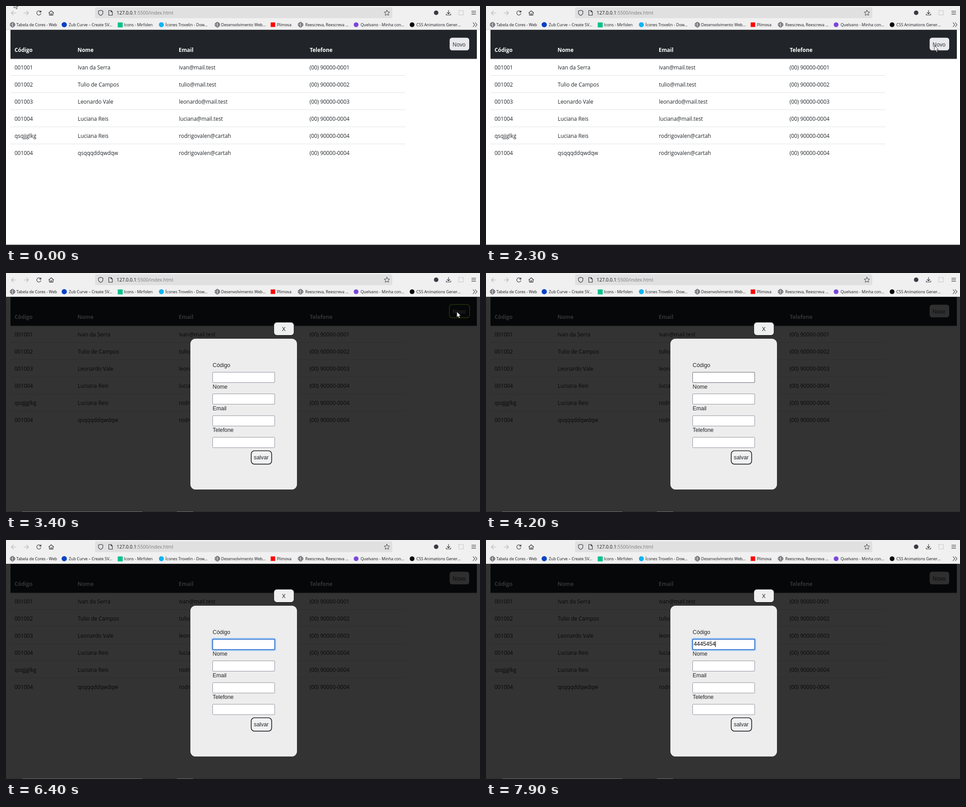
Animation of 1054x531 px, one loop 8000 ms. Source, as an HTML page:

```html
<!DOCTYPE html>
<html lang="pt-BR">
<head>
<meta charset="utf-8">
<title>Cadastro</title>
<style>
html, body { margin: 0; width: 100%; height: 100%; overflow: hidden; background: #fff; }
#stage { position: relative; width: 1054px; height: 531px; overflow: hidden; }
svg { position: absolute; left: 0; top: 0; display: block; }

.page { font: 11.9px "Open Sans", "Noto Sans", sans-serif; fill: #212529; }
.head { font-weight: 700; fill: #fff; }
.lines { stroke: #dee2e6; }
.bar { font: 8.8px "Open Sans", "Noto Sans", sans-serif; fill: #15141a; }
.url { font-size: 10.4px; }
.icon { fill: none; stroke: #2b2a33; stroke-width: 1.1; stroke-linecap: round; stroke-linejoin: round; }
.thin { stroke-width: .9; }
.faint { stroke: #b4b4b7; }
.form { font: 12.35px Arial, "Liberation Sans", sans-serif; fill: #212529; }
.field { fill: #fff; stroke: #8f8f9d; }
.list { font: 8.6px "Open Sans", "Noto Sans", sans-serif; fill: #111; }
.box { fill: #fff; stroke: #b4b4b8; }

#typed {
  position: absolute; left: 462px; top: 225px; height: 13px; width: 0;
  overflow: hidden; white-space: nowrap; color: #000;
  font: 12.35px/13px Arial, "Liberation Sans", sans-serif;
  border-right: 1px solid transparent;
}

/* 100 ms = 1.25 % */
#cursor, #hover, #modal, #over, #focus, #options, #match { animation: 8s step-end infinite; }
#cursor { animation-name: move; }
#hover { animation-name: hover; }
#modal { animation-name: open; }
#over { animation-name: over; }
#focus { animation-name: focus; }
#options { animation-name: options; }
#match { animation-name: match; }
#typed { animation: type 8s step-end infinite, blink 8s step-end infinite; }

@keyframes move {
  0% { transform: translate(18px, -8px); }
  2.5% { transform: translate(18px, -8px); animation-timing-function: steps(3); }
  6.25% { transform: translate(740px, 199px); }
  8.75% { transform: translate(740px, 199px); animation-timing-function: steps(8); }
  18.75% { transform: translate(1006px, 112px); }
  20% { transform: translate(1006px, 112px); animation-timing-function: steps(7); }
  28.75% { transform: translate(997px, 88px); }
  33.75% { transform: translate(997px, 88px); animation-timing-function: steps(4); }
  38.75% { transform: translate(1002.5px, 86px); }
  42.5% { transform: translate(1002.5px, 86px); animation-timing-function: steps(4); }
  47.5% { transform: translate(1011px, 82px); }
  48.75% { transform: translate(1011px, 82px); animation-timing-function: steps(3); }
  52.5%, 100% { transform: translate(530px, 226px); visibility: hidden; }
}
@keyframes hover {
  0% { opacity: 0; }
  28.75% { opacity: 0; animation-timing-function: steps(3); }
  32.5% { opacity: 1; }
  42.5% { opacity: 1; animation-timing-function: steps(4); }
  47.5%, 100% { opacity: 0; }
}
@keyframes open { 0% { opacity: 0; } 42.5%, 100% { opacity: 1; } }
@keyframes over { 0% { opacity: 0; } 52.5% { opacity: 1; } 55%, 100% { opacity: 0; } }
@keyframes focus { 0% { opacity: 0; } 55%, 100% { opacity: 1; } }
@keyframes options { 0% { opacity: 0; } 57.5% { opacity: 1; } 66.25% { opacity: .4; } 67.5%, 100% { opacity: 0; } }
@keyframes match { 0% { opacity: 0; } 86.25% { opacity: 1; } 97.5% { opacity: .4; } 98.75%, 100% { opacity: 0; } }
@keyframes type {
  0% { width: 0; }
  85% { width: 1ch; }
  86.25% { width: 2ch; }
  87.5% { width: 3ch; }
  90% { width: 4ch; }
  96.25% { width: 5ch; }
  97.5% { width: 6ch; }
  98.75%, 100% { width: 7ch; }
}
@keyframes blink {
  0%, 67.5%, 80%, 92.5% { border-color: transparent; }
  61.25%, 73.75%, 85%, 96.25%, 100% { border-color: #000; }
}
</style>
</head>
<body>
<div id="stage">
<svg width="1054" height="531" viewBox="0 0 1054 531">
  <defs>
    <g id="globe" class="icon thin">
      <circle r="5.3"/><ellipse rx="2.4" ry="5.3"/><path d="M-5 -1.7H5M-5 1.7H5"/>
    </g>
  </defs>

  <rect width="1054" height="531" fill="#fff"/>

  <g class="page">
    <rect x="10" y="53" width="1037" height="64.5" fill="#212529"/>
    <path d="M10 116H1047" stroke="#373b3e" stroke-width=".8"/>
    <text class="head" y="102"><tspan x="19">Código</tspan><tspan x="159">Nome</tspan><tspan x="384">Email</tspan><tspan x="675.5">Telefone</tspan></text>
    <path class="lines" d="M10 154.5H888M10 192.5H888M10 230.5H888M10 268.5H888M10 306.5H888"/>
    <text y="141"><tspan x="19">001001</tspan><tspan x="159.5">Ivan da Serra</tspan><tspan x="384.5">ivan@mail.test</tspan><tspan x="675">(00) 90000-0001</tspan></text>
    <text y="179"><tspan x="19">001002</tspan><tspan x="159.5">Tulio de Campos</tspan><tspan x="384.5">tulio@mail.test</tspan><tspan x="675">(00) 90000-0002</tspan></text>
    <text y="217"><tspan x="19">001003</tspan><tspan x="159.5">Leonardo Vale</tspan><tspan x="384.5">leonardo@mail.test</tspan><tspan x="675">(00) 90000-0003</tspan></text>
    <text y="255"><tspan x="19">001004</tspan><tspan x="159.5">Luciana Reis</tspan><tspan x="384.5">luciana@mail.test</tspan><tspan x="675">(00) 90000-0004</tspan></text>
    <text y="293"><tspan x="19">qsqjjglkg</tspan><tspan x="159.5">Luciana Reis</tspan><tspan x="384.5">rodrigovalen@cartah</tspan><tspan x="675">(00) 90000-0004</tspan></text>
    <text y="331"><tspan x="19">001004</tspan><tspan x="159.5">qsqqqddqwdqw</tspan><tspan x="384.5">rodrigovalen@cartah</tspan><tspan x="675">(00) 90000-0004</tspan></text>

    <rect x="986.5" y="70.5" width="43.5" height="28" rx="5.5" fill="#e9e9ed"/>
    <text x="993" y="90">Novo</text>
    <g id="hover">
      <rect x="985.7" y="69.7" width="45.4" height="29.7" rx="7" fill="#212529" stroke="#adff2f" stroke-width="1.6"/>
      <text x="993" y="90" fill="#fff">Novo</text>
    </g>
    <path d="M0 530.5H1054" stroke="#66666a"/>
  </g>

  <g id="modal">
    <rect y="53" width="1054" height="478" fill="#000" opacity=".8"/>
    <path d="M0 530.5H1054" stroke="#2c2729"/>
    <path d="M36 530.5H303M380 530.5H416" stroke="#747474"/>
    <g class="form">
      <rect x="595.3" y="109.3" width="45.4" height="29.6" rx="7" fill="#efefef" stroke="#212529" stroke-width="1.6"/>
      <text x="613.5" y="129">X</text>
      <rect x="410" y="146" width="237" height="335" rx="11.5" fill="#ededed"/>
      <text x="459.5" y="209">Código</text>
      <text x="459.5" y="257">Nome</text>
      <text x="459.5" y="305">Email</text>
      <text x="459.5" y="353">Telefone</text>
      <g class="field">
        <rect x="459.5" y="220.5" width="138" height="23" rx="1.5"/>
        <rect x="459.5" y="268.5" width="138" height="23" rx="1.5"/>
        <rect x="459.5" y="317" width="138" height="23" rx="1.5"/>
        <rect x="459.5" y="365" width="138" height="23" rx="1.5"/>
      </g>
      <rect x="545.3" y="395" width="45.4" height="29.6" rx="7" fill="#f1f1f1" stroke="#212529" stroke-width="1.7"/>
      <text x="551" y="414">salvar</text>
      <rect id="over" x="459.5" y="220.5" width="138" height="23" rx="1.5" fill="#fff" stroke="#676774"/>
      <g id="focus">
        <rect x="457.6" y="218.6" width="141.8" height="26.8" rx="3.5" fill="none" stroke="#a6d0f8" stroke-width="2.4"/>
        <rect x="459.5" y="220.5" width="138" height="23" rx="1.5" fill="#fff" stroke="#0a55c4" stroke-width="1.5"/>
      </g>
    </g>

    <g id="options" class="list">
      <rect class="box" x="460.5" y="243.5" width="136" height="94"/>
      <text y="256"><tspan x="464">qsq</tspan><tspan x="464" dy="15.4">dqdq</tspan><tspan x="464" dy="15.4">001004</tspan><tspan x="464" dy="15.4">qsqjjglkg</tspan><tspan x="464" dy="15.4">sfsfs</tspan><tspan x="464" dy="15.4">ss</tspan></text>
      <rect x="583" y="244" width="13" height="93" fill="#f5f5f5"/>
      <rect x="583" y="257" width="13" height="16" fill="#c9c9c9"/>
      <path class="icon" d="M586.5 251.5l3 -3 3 3M586.5 329.5l3 3 3 -3"/>
    </g>
    <g id="match" class="list">
      <rect class="box" x="460.5" y="243.5" width="136" height="16"/>
      <text x="464" y="256">444555</text>
    </g>
  </g>

  <g class="bar">
    <rect width="1054" height="52.5" fill="#f0f0f0"/>
    <path d="M0 52.5H1054" stroke="#d2d2d3"/>
    <rect x="198" y="3" width="661" height="24" rx="3.5" fill="#e1e0e0"/>
    <path class="icon faint" d="M22 15.5H12M16.5 11l-4.5 4.5 4.5 4.5M39.5 15.5H50M45.5 11l4.5 4.5 -4.5 4.5"/>
    <path class="icon" d="M77.2 13.2A4.7 4.7 0 1 0 77.6 16.8M77.9 10.2V13.7H74.4"/>
    <path class="icon" d="M95 15.5l5.5 -5 5.5 5M96.5 14.5V20.5H104.5V14.5M99.3 20.5V17H101.7V20.5"/>
    <path class="icon" d="M210.5 9.5l5 1.7V14.5Q215.5 19 210.5 21Q205.5 19 205.5 14.5V11.2Z"/>
    <path class="icon" d="M228.5 10H233.5L236.5 13V20.5H228.5ZM233.5 10V13H236.5"/>
    <path class="icon thin" d="M847 9.3l1.8 3.8 4.2 .5 -3.1 2.9 .8 4.2 -3.7 -2 -3.7 2 .8 -4.2 -3.1 -2.9 4.2 -.5Z"/>
    <circle cx="956.5" cy="15" r="5" fill="#3a3944"/>
    <path class="icon" d="M984 9.5V17M981 14.5l3 3 3 -3M979 17.5V20H989V17.5"/>
    <rect class="icon faint" x="1007" y="10" width="10" height="10" stroke-dasharray="1.5 2"/>
    <path class="icon" d="M1035.5 11.5H1044.5M1035.5 15H1044.5M1035.5 18.5H1044.5"/>
    <path class="icon" d="M1038.5 37l4 4.5 -4 4.5M1043.5 37l4 4.5 -4 4.5"/>
    <text class="url" x="246" y="19">127.0.0.1<tspan fill="#7b7a80">:5500/index.html</tspan></text>

    <use href="#globe" x="14.5" y="41.5"/>
    <circle cx="129.5" cy="41.5" r="5.8" fill="#0a41c6"/>
    <rect x="248.5" y="36.5" width="11" height="11" fill="#08c18a"/>
    <circle cx="345.5" cy="41.5" r="5.5" fill="#0db4f4"/>
    <use href="#globe" x="470" y="41.5"/>
    <rect x="588.5" y="36.5" width="10" height="10" fill="#f00"/>
    <use href="#globe" x="655" y="41.5"/>
    <circle cx="778.5" cy="41.5" r="5.3" fill="#7b45dc"/>
    <circle cx="903" cy="41.5" r="5.3" fill="#0a0a0a"/>
    <text y="45"><tspan x="23">Tabela de Cores - Web</tspan><tspan x="139.5">Zub Curve – Create SV...</tspan><tspan x="262.5">Icons - Mirfolen</tspan><tspan x="354.5">Ícones Trovelin - Dow...</tspan><tspan x="478.5">Desenvolvimento Web...</tspan><tspan x="602.5">Plimova</tspan><tspan x="665.5">Reescreva, Reescreva ...</tspan><tspan x="788.5">Quelvano - Minha con...</tspan><tspan x="912.5">CSS Animations Gener...</tspan></text>
  </g>
</svg>

<div id="typed">4445454</div>

<svg width="1054" height="531" viewBox="0 0 1054 531">
  <path id="cursor" d="M0 0V12.5L2.9 9.9 4.9 14.5 7 13.6 5 9.1H8.9Z" fill="#fff" stroke="#111" stroke-width=".8"/>
</svg>
</div>
</body>
</html>
```
